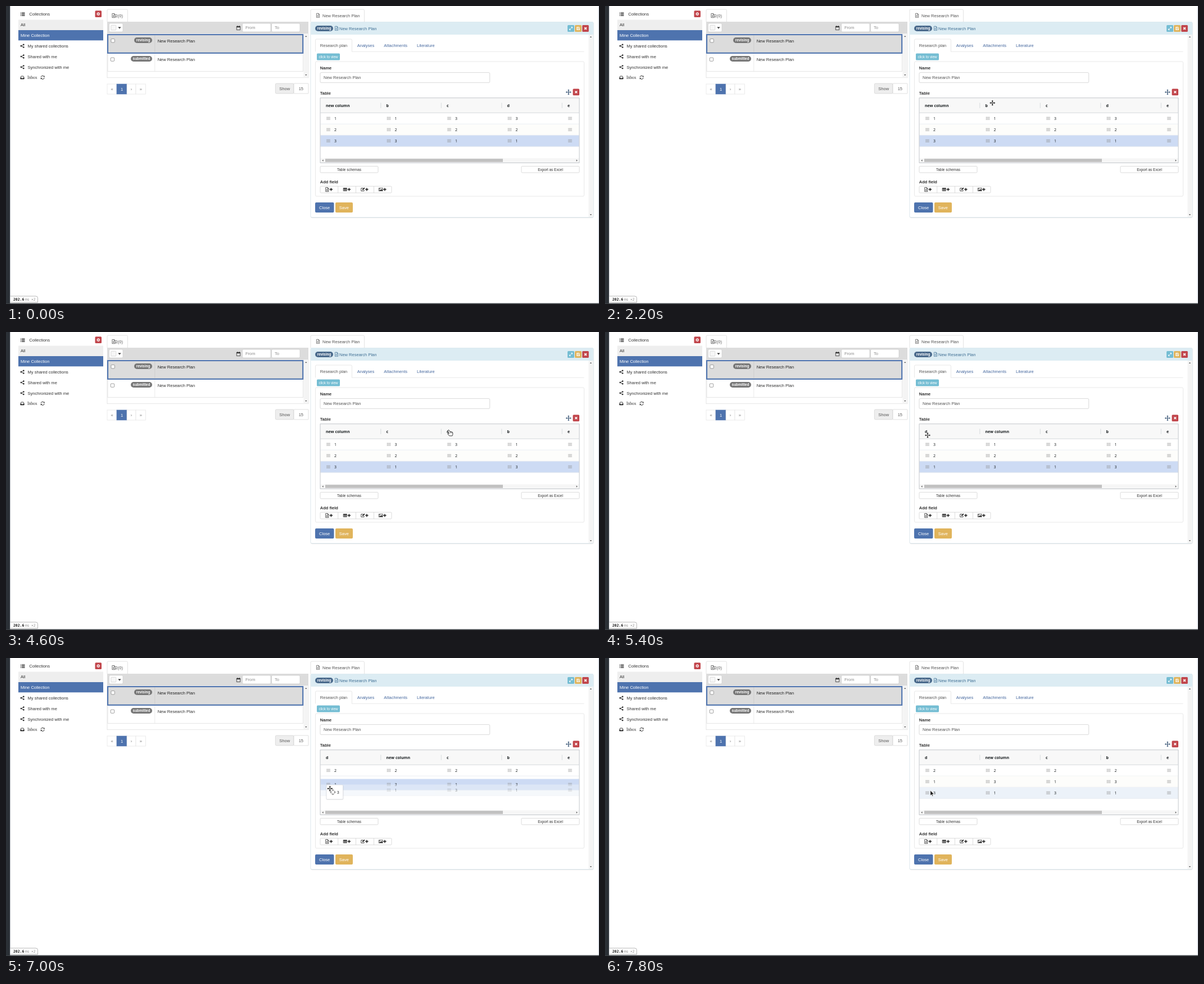
An HTML page that plays this animation: 1055x531 px, repeating every 8000 ms.

```html
<!DOCTYPE html>
<html lang="en">
<head>
<meta charset="utf-8">
<title>Research plan table</title>
<style>
html, body { margin: 0; width: 100%; height: 100%; overflow: hidden; background: #fff; }
svg { display: block; width: 100vw; height: 100vh; }
text { white-space: pre; }
</style>
</head>
<body>
<svg id="stage" viewBox="0 0 1055 531" xmlns="http://www.w3.org/2000/svg">
  <defs><clipPath id="clip"><rect x="559.5" y="164" width="460" height="107"/></clipPath></defs>
  <g id="page"></g>
  <g id="grid" clip-path="url(#clip)"></g>
  <g id="frame"></g>
  <g id="pointer"></g>
</svg>
<script>
const SANS = "'Liberation Sans', Arial, sans-serif";
const GRID = "'Open Sans', 'Noto Sans', sans-serif";
const MONO = "'DejaVu Sans Mono', monospace";
const BLUE = '#4e73ae', RED = '#c1454b', AMBER = '#e0b45c', TEAL = '#74bdd3', DARK = '#333';
const $ = id => document.getElementById(id);

// ---- drawing helpers ----
const rect = (x, y, x2, y2, fill, line = 'none', r = 0, w = 0.6) =>
  `<rect x="${x}" y="${y}" width="${x2 - x}" height="${y2 - y}" rx="${r}" fill="${fill}" stroke="${line}" stroke-width="${w}"/>`;

// y is the middle of the capital letters
const text = (x, y, s, fill = DARK, o = {}) => {
  const size = o.size || 7.53;
  return `<text x="${x}" y="${y + size * 0.36}" font-size="${size}" fill="${fill}" font-family="${o.font || SANS}"` +
    ` font-weight="${o.bold ? 700 : 400}" text-anchor="${o.mid ? 'middle' : 'start'}">${s}</text>`;
};
const path = (d, fill = 'none', line = 'none', w = 0.8) =>
  `<path d="${d}" fill="${fill}" stroke="${line}" stroke-width="${w}" stroke-linejoin="round"/>`;
const at = (x, y, s, extra = '') => `<g transform="translate(${x} ${y})" ${extra}>${s}</g>`;
const line = (x, y, x2, y2, c = '#ddd', w = 0.6) => path(`M${x} ${y}L${x2} ${y2}`, 'none', c, w);

// ---- icons, centred on the origin ----
const doc = c => path('M-2.6-3.6H1L2.7-1.9V3.6H-2.6ZM.8-3.6V-1.7H2.7M-1.4 0H1.5M-1.4 1.6H1.5', 'none', c, 0.75);
const plus = path('M-2.6 0H2.6M0-2.6V2.6', 'none', '#222', 1.5);
const cross = path('M-1.9-1.9L1.9 1.9M1.9-1.9L-1.9 1.9', 'none', '#fff', 1.5);
const share = path('M2.3-2.3L-2.1 0L2.3 2.3', 'none', DARK, 0.9) +
  [[2.3, -2.3], [-2.1, 0], [2.3, 2.3]].map(p => `<circle cx="${p[0]}" cy="${p[1]}" r="1.35" fill="${DARK}"/>`).join('');
const list = path('M-3.8-2.6H-2.6M-3.8-.8H-2.6M-3.8 1H-2.6M-3.8 2.8H-2.6M-1.7-2.6H3.8M-1.7-.8H3.8M-1.7 1H3.8M-1.7 2.8H3.8', 'none', DARK, 1.1);
const inbox = path('M-2-2.4H2L3.2.4V2.6H-3.2V.4Z', 'none', DARK, 0.9) + path('M-3.2.4H-1L-.6 1.3H.6L1 .4H3.2V2.6H-3.2Z', DARK);
const refresh = path('M-3.1-.6A3.2 3.2 0 0 1 2.4-2M3.1.6A3.2 3.2 0 0 1-2.4 2', 'none', DARK, 1) +
  path('M3.5-3.4V-.7H.9ZM-3.5 3.4V.7H-.9Z', DARK);
const cog = `<circle r="1.7" fill="none" stroke="#fff" stroke-width="1.3"/><circle r="2.7" fill="none" stroke="#fff" stroke-width=".9" stroke-dasharray="1.06"/>`;
const calendar = path('M-3.2-2.6H3.2V3.6H-3.2Z', 'none', DARK, 0.8) + path('M-3.2-2.8H3.2V-.9H-3.2Z', DARK) + path('M-1.7-4V-2M1.7-4V-2', 'none', DARK, 1);
const expand = path('M-2.4 2.4L2.4-2.4M.2-2.6H2.6V-.2M-.2 2.6H-2.6V.2', 'none', '#fff', 0.9);
const disk = path('M-2.5-2.5H1.5L2.5-1.5V2.5H-2.5ZM-1.3-2.5V-.7H1V-2.5M-1.5 2.5V.8H1.5V2.5', 'none', '#fff', 0.8);
const sheet = path('M-3.1-2.5H3.1V2.5H-3.1ZM-3.1-.8H3.1M-3.1.9H3.1M-1-2.5V2.5M1-2.5V2.5', 'none', '#222', 0.7) + path('M-3.1-2.8H3.1V-1.5H-3.1Z', '#222');
const pencil = path('M1-2.5H-3V2.7H2.3V.6', 'none', '#222', 0.8) + path('M-1 1.1L-.7-.6L2.6-3.6L3.8-2.4L.7.8Z', '#222');
const image = path('M-3.5-2.6H3.5V2.6H-3.5Z', 'none', '#222', 0.7) + path('M-2.8 2L-1.2 0L0 1L1.6-1L2.8.6V2Z', '#222') + '<circle cx="-1.9" cy="-1.2" r=".7" fill="#222"/>';
const tips = 'M0-5L1.8-3H-1.8ZM0 5L1.8 3H-1.8ZM-5 0L-3-1.8V1.8ZM5 0L3-1.8V1.8Z';
const move = c => path(tips, c) + path('M-4 0H4M0-4V4', 'none', c, 1.2);
const tri = (x, y, dir, c = '#555') => at(x, y, path('M-1.7 .9H1.7L0-1.1Z', c), '').replace('">', ` ) rotate(${dir})">`.replace(' )', '')).replace(') rotate', ') rotate');
const arrowMark = (x, y, deg) => `<g transform="translate(${x} ${y}) rotate(${deg})">${path('M-1.7 .9H1.7L0-1.1Z', '#555')}</g>`;
const grip = (x, y) => path([-2, 0, 2].map(dy => `M${x} ${y + dy}h6.4`).join(''), 'none', '#8a8a8a', 1.1)
  .replace('/>', ' stroke-dasharray="1.1 .65"/>');

const button = (x, y, x2, y2, fill, icon) => rect(x, y, x2, y2, fill, 'none', 1.5) + at((x + x2) / 2, (y + y2) / 2, icon);
const badge = (x, y, x2, s, fill) => rect(x, y - 5, x2, y + 5, fill, 'none', 5) +
  text((x + x2) / 2, y, s, '#fff', { size: 6.45, bold: 1, mid: 1 });
const PLAN = 'New Research Plan';

function sidebar() {
  return rect(0, 0, 7, 531, '#2b3036') + rect(7, 0, 7.8, 531, '#b9bec6') + rect(1053.6, 0, 1055, 531, '#d9dde5') +
    at(29.7, 14.3, list) + text(41.3, 14.5, 'Collections') + button(158.5, 8.3, 170, 20, RED, cog) +
    rect(22, 24.5, 173, 43, '#eeeeee') + text(26, 33.5, 'All') +
    rect(22, 43, 173, 61.3, BLUE) + text(26, 52.3, 'Mine Collection', '#fff') +
    ['My shared collections', 'Shared with me', 'Synchronized with me'].map((s, i) =>
      at(29, 71.2 + i * 18.8, share) + text(38.6, 71.3 + i * 18.8, s)).join('') +
    at(29, 127.4, inbox) + text(38, 127.6, 'Inbox', DARK, { font: "'Liberation Serif', serif" }) + at(65.2, 127.3, refresh) +
    path('M7.8 517H53Q56.5 517 56.5 520.5V528H7.8', '#fff', '#999', 0.7) +
    text(13, 522.3, '202.6', '#111', { size: 6.4, font: MONO, bold: 1 }) +
    text(34, 522.5, 'ms', '#888', { size: 6.4, font: MONO }) + text(45, 522.5, '×2', '#888', { size: 6.2, font: MONO }) +
    rect(0, 529.6, 1055, 531, '#3b3f44');
}

function results() {
  const check = (x, y) => rect(x, y, x + 6.3, y + 6.3, '#fff', '#767676', 1, 0.7);
  const field = (x, s) => rect(x, 31, x + 50.5, 46, '#fff', '#c4c4c4', 2) + text(x + 5.5, 38.5, s, '#8c8c8c');
  const pages = [[180, 197, '«'], [197, 215, '1'], [215, 231, '›'], [231, 248.5, '»']];
  return path('M180 28V8Q180 6 182 6H214.5Q216.5 6 216.5 8V28', '#fff', '#d0d0d0', 0.6) +
    at(191.5, 17, doc('#444')) + text(194.6, 17, '2(0)', '#555') +
    rect(180, 28, 538, 49, '#dcdcdc') + rect(183.5, 31, 208, 46, '#fff', '#ccc', 2) +
    rect(186.8, 34.3, 195.8, 43, '#f7f7f7', '#c4c4c4', 1) + path('M199.3 37.6H204.7L202 40.4Z', DARK) +
    at(413.5, 39, calendar) + field(420.5, 'From') + field(472.5, 'To') +
    rect(180, 49, 538, 127.8, '#fff', '#d4d4d4') + rect(529.5, 49.3, 537.7, 127.5, '#f4f4f4') +
    arrowMark(533.8, 54, 0) + arrowMark(533.8, 123, 180) +
    rect(181, 84.5, 528.7, 116.5, '#fff', '#d4d4d4') + rect(181, 51, 528.2, 83.8, '#dcdcdc', BLUE, 0, 2.1) +
    line(264.7, 52, 264.7, 83, '#c4c4c4') + line(264.7, 85, 264.7, 116.5) +
    check(187, 58.6) + check(186.3, 92) + badge(228, 61, 260, 'revising', '#777') + badge(222, 94, 260, 'submitted', '#777') +
    text(269.7, 62, PLAN, '#222') + text(269.7, 95.3, PLAN) +
    pages.map(([x, x2, s], i) => rect(x, 139, x2, 157, i === 1 ? BLUE : '#fff', i === 1 ? BLUE : '#ddd') +
      text((x + x2) / 2, 148, s, i === 1 ? '#fff' : '#777', { mid: 1 })).join('') +
    rect(479.3, 138, 512, 156, '#eee', '#ccc', 2) + text(486.3, 147, 'Show', '#555') +
    rect(512, 138, 538, 156, '#fff', '#ccc', 1) + text(520.7, 147, '15', '#555');
}

function details() {
  const adders = [[574.5, doc('#222')], [606.5, sheet], [638, pencil], [670, image]];
  const wide = (x, s) => rect(x, 285.5, x + 103, 297, '#fff', '#c4c4c4', 1.5) + text(x + 51.5, 291.2, s, DARK, { size: 6.45, mid: 1 });
  return rect(542.3, 29, 1045, 377.3, '#fff', '#e3e3e3', 2, 1) +
    path('M542 28.5V8Q542 6 544 6H635.5Q637.5 6 637.5 8V28.5', '#fff', '#d0d0d0', 0.6) +
    at(555, 16.8, doc('#555')) + text(563, 17, PLAN, '#555') +
    rect(542, 28.5, 1045, 376.5, '#fff', '#c9dde6', 2) + rect(542.3, 28.8, 1044.7, 51, '#dcecf3') +
    badge(550, 40, 582, 'revising', '#4a6a8c') + at(588, 39.8, doc('#3f6f94')) + text(593, 40, PLAN, '#3f6f94') +
    button(999, 34, 1011, 46, TEAL, expand) + button(1012, 34, 1024, 46, AMBER, disk) + button(1025.2, 34, 1036.8, 46, RED, cross) +
    rect(1036.5, 51, 1044.5, 376, '#f4f4f4') + arrowMark(1040.4, 55, 0) + arrowMark(1040.4, 372, 180) +
    path('M550.5 81.3V61Q550.5 59 552.5 59H613.5Q615.5 59 615.5 61V81.3H1028.5', 'none', '#d8d8d8', 0.6) +
    text(558.8, 70.3, 'Research plan', '#555') +
    [[624.7, 'Analyses'], [672.3, 'Attachments'], [731, 'Literature']].map(([x, s]) => text(x, 70.3, s, '#47699f')).join('') +
    rect(553, 84.5, 594, 96.5, TEAL, 'none', 1.5) + text(573.6, 90.4, 'click to view', '#fff', { size: 6.45, mid: 1 }) +
    rect(550.5, 99, 1028.5, 339, '#fff', '#d8d8d8', 2) +
    text(558.8, 110.7, 'Name', DARK, { bold: 1 }) + rect(559, 118.6, 860.7, 136.6, '#fff', '#bfbfbf', 2) + text(565, 127.7, PLAN, '#555') +
    text(558.8, 155.6, 'Table', DARK, { bold: 1 }) + at(1000.8, 153.5, move('#3c5878')) + button(1008.5, 147.6, 1020, 159.2, RED, cross) +
    wide(559, 'Table schemas') + wide(917, 'Export as Excel') +
    text(558.8, 313.3, 'Add field', DARK, { bold: 1 }) + rect(559, 321.2, 686, 333, '#fff', '#c4c4c4', 1.5) +
    [590.7, 622.5, 654.5].map(x => line(x, 321.2, x, 333, '#c4c4c4')).join('') +
    adders.map(([x, icon]) => at(x - 3.2, 327, icon) + at(x + 3.9, 326.8, plus)).join('') +
    rect(550, 350, 583.5, 368, BLUE, 'none', 2) + text(566.7, 359, 'Close', '#fff', { mid: 1 }) +
    rect(586, 350, 617, 368, AMBER, 'none', 2) + text(601.4, 359, 'Save', '#fff', { mid: 1 });
}

function gridFrame() {
  return rect(559.2, 271.3, 1019.8, 279, '#f6f6f6') + rect(568, 272.2, 884, 278, '#c1c1c1') +
    arrowMark(563.6, 275.2, -90) + arrowMark(1015.6, 275.2, 90) + rect(559, 163.8, 1020, 279.5, 'none', '#a9aeb5', 0, 0.7);
}

// ---- timing ----
const LOOP = 8000, STEP = 100;
const BURSTS = [[0, 0], [1200, 1900], [2200, 2400], [2600, 3400], [3500, 4300], [4400, 5100], [5400, 5400],
  [5600, 5900], [6100, 6200], [6500, 7300], [7400, 7500], [7700, 7800]];
function snap(t) {
  const [, end] = BURSTS.filter(b => b[0] <= t).pop();
  return Math.min(Math.floor(t / STEP) * STEP, end);
}
const slide = (t, start) => Math.max(0, Math.min(1, (t - start) / 200));

// time, x, y, pointer shape, dragged label
const TRACK = [
  [1200, 274, 61, 'arrow'], [1500, 470, 120, 'arrow'], [1700, 655, 170, 'move'], [1800, 688, 179, 'move'],
  [1900, 689.3, 172.7, 'move'], [2200, 689.3, 172.7, 'move'], [2300, 725, 175, 'hand', 'b'],
  [2400, 818, 177, 'hand', 'b'], [2600, 826, 178, 'hand', 'b'], [2700, 828, 178, 'move'], [3000, 893, 177, 'move'],
  [3100, 890, 177, 'hand', 'd'], [3200, 872, 178, 'hand', 'd'], [3300, 849.5, 179, 'hand', 'd'],
  [3500, 805, 178, 'hand', 'd'], [3800, 792, 176, 'move'], [4100, 785, 169, 'move'], [4300, 788, 173, 'move'],
  [4500, 789, 175, 'hand'], [4600, 789, 175, 'hand'], [4700, 770, 178, 'hand', 'd'], [5000, 610, 183, 'hand', 'd'],
  [5100, 574, 184, 'hand', 'd'], [5400, 574, 184, 'move'], [5600, 577, 186, 'move'], [5900, 593, 205.5, 'move'],
  [6100, 586, 205.5, 'move'], [6200, 578, 205, 'move'], [6500, 573.5, 201, 'move', '3'], [7000, 576.3, 232.7, 'move', '3'],
  [7300, 578, 245, 'move', '3'], [7400, 579, 247, 'arrow'], [7500, 579, 247, 'arrow'], [7700, 579, 241, 'arrow'], [7800, 578.8, 236, 'arrow']
];
function pose(t) {
  const i = TRACK.findLastIndex(k => k[0] <= t);
  if (i < 0) return null;
  const a = TRACK[i], b = TRACK[i + 1] || a;
  const p = b === a ? 0 : (t - a[0]) / (b[0] - a[0]);
  return { x: a[1] + (b[1] - a[1]) * p, y: a[2] + (b[2] - a[2]) * p, shape: a[3], label: a[4] };
}

// ---- table ----
const PITCH = 107.5, ROW = 20;
const ROWS = [{ n: 1, b: 1, c: 3, d: 3 }, { n: 2, b: 2, c: 2, d: 2 }, { n: 3, b: 3, c: 1, d: 1 }];

function columnSlots(t) {
  const bc = slide(t, 2256), db = slide(t, 3256), dc = slide(t, 4700), dn = slide(t, 4900);
  return { n: dn, b: 1 + bc + db, c: 2 - bc + dc, d: 3 - db - dc - dn, e: 4 };
}

function header(slots, dragged) {
  const cols = Object.keys(slots).sort((a, b) => (a === dragged) - (b === dragged));
  return rect(559, 164, 1020, 190.3, '#f8f8f8') + cols.map(c => {
    const x = 559.3 + slots[c] * PITCH;
    const body = c === dragged ? rect(x, 164, x + PITCH, 190, '#fff')
      : text(x + 9.7, 177.3, c === 'n' ? 'new column' : c, '#181d1f', { size: 7, font: GRID, bold: 1 });
    return body + line(x + PITCH, 172.5, x + PITCH, 182, '#cfd3d8', 0.8);
  }).join('') + line(559, 190.3, 1020, 190.3, '#babfc7');
}

function row(i, slot, slots, t) {
  const y = 190.5 + slot * ROW, mid = y + 9.8;
  const hovered = i === 0 && t >= 5800, selected = i === 2 && t < 7400;
  const fill = hovered ? '#ecf2f9' : selected ? '#cddbf4' : Math.round(slot) % 2 ? '#fdfdfb' : '#fff';
  const cells = Object.keys(slots).map(c => {
    const x = 559.3 + slots[c] * PITCH;
    return grip(x + 11, mid) + text(x + 24.7, mid, ROWS[i][c] || '', '#181d1f', { size: 7, font: GRID });
  }).join('');
  const focus = i === 0 && t === 6500 ? rect(559.5, y, 666.6, y + 19.3, 'none', '#6a9bd0', 0, 0.8) : '';
  const fade = i === 0 && t >= 6600 && t < 7400 ? 0.5 : 1;
  return `<g opacity="${fade}">${rect(559, y, 1020, y + ROW, fill)}${line(559, y + 19.7, 1020, y + 19.7, '#dde2eb')}${cells}${focus}</g>`;
}

function table(t, dragged) {
  const slots = columnSlots(t), down = slide(t, 6650), last = slide(t, 6850);
  const order = [down + last, 1 - down, 2 - last];
  return rect(559, 164, 1020, 272, '#fff') + [1, 2, 0].map(i => row(i, order[i], slots, t)).join('') + header(slots, dragged);
}

// ---- pointer ----
const POINTERS = {
  arrow: path('M0 0V9.2L2.2 7.3L3.6 10.4L5 9.8L3.7 6.8H6.6Z', '#111', '#fff', 0.7),
  move: path(tips, 'none', '#fff', 1.8) + move('#222') + path('M-1.1-1.1H1.1V1.1H-1.1Z', '#fff', '#222', 0.6),
  hand: path('M-2.6 0Q-1.6-1.1-.7 0L.8 2.5L3.8 2.9Q5.7 3.2 5.8 5V7.4Q5.6 9 4.9 10H-.2L-3.2 6.7Q-3.3 5.4-1.8 5.7L-.8 6.3L-2.7 1Z', '#fff', '#222', 0.9) +
    path('M1.1 3V5.3M2.7 3.2V5.3M4.2 3.3V5.3', 'none', '#222', 0.6)
};
function ghost({ x, y, label, shape }) {
  const icon = shape === 'hand' ? path('M-3.5 0H3.5M1.6-2L3.6 0L1.6 2', 'none', '#333', 0.8)
    : path(tips, '#fff', '#333', 0.6);
  return at(x - 6.3, y - 6.6, rect(-0.6, 0.4, 30.6, 27, '#00000012', 'none', 2) + rect(0, 0, 29.6, 25.6, '#fff', '#d0d4da', 1.5) +
    at(11.5, 13, icon) + text(18.7, 13.1, label, '#181d1f', { size: 7, font: GRID }));
}

function draw(t) {
  const p = pose(t);
  $('grid').innerHTML = table(t, p && p.shape === 'hand' ? p.label : undefined);
  $('pointer').innerHTML = p ? (p.label ? ghost(p) : '') + at(p.x, p.y, POINTERS[p.shape]) : '';
}

$('page').innerHTML = sidebar() + results() + details();
$('frame').innerHTML = gridFrame();

const begin = performance.now();
let shown = -1;
function tick() {
  const t = snap((performance.now() - begin) % LOOP);
  if (t !== shown) draw(shown = t);
  requestAnimationFrame(tick);
}
tick();
</script>
</body>
</html>
```
